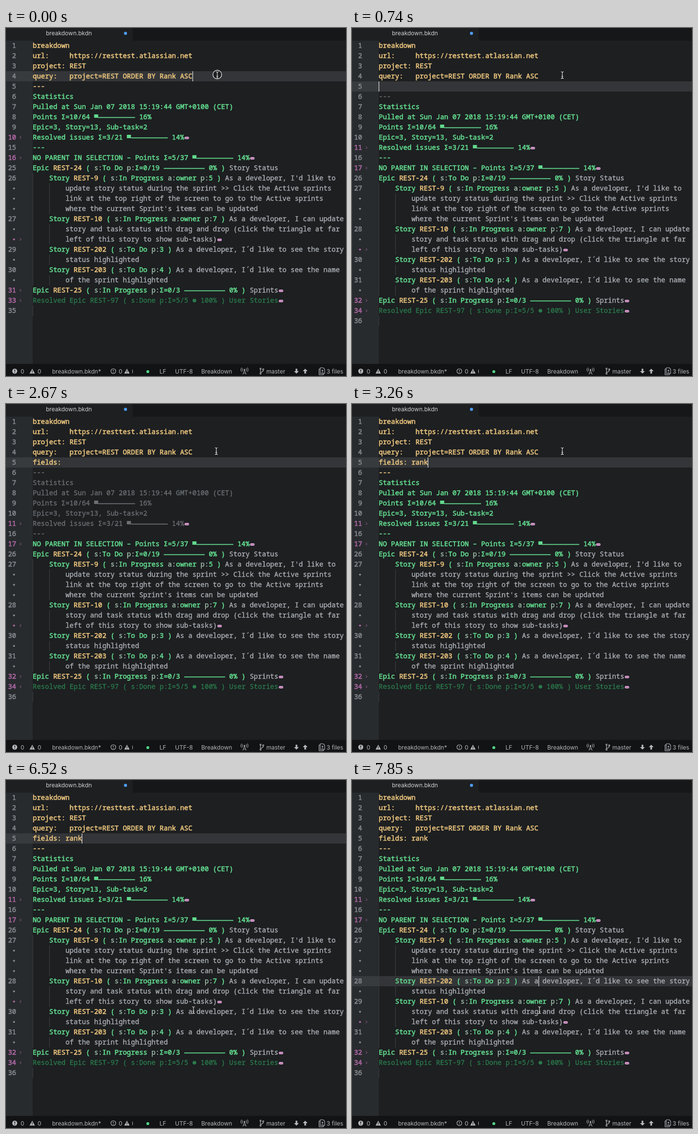
An HTML page with a canvas that plays this animation: 700x717 px, repeating every 8000 ms.

```html
<!DOCTYPE html>
<html lang="en">
<head>
<meta charset="utf-8">
<title>Editor</title>
<style>
html, body { margin: 0; width: 100%; height: 100%; overflow: hidden; background: #1d1f21; }
canvas { display: block; }
</style>
</head>
<body>
<canvas id="stage" width="700" height="717"></canvas>
<script>
const ctx = document.getElementById('stage').getContext('2d');
const LOOP = 8000, TICK = LOOP / 54;
const LEFT = 55, TOP = 26, ROW = 21, CELL = 8.428;
const MONO = '500 14.05px "Noto Sans Mono", "DejaVu Sans Mono", monospace';
const UI = '12px Inter, Roboto, sans-serif';
const YELLOW = '#e8c27c', GREEN = '#62d98d', DIM = '#2a7a4b', LABEL = '#a3c0ae',
      TEXT = '#adb1b6', GREY = '#6c7074', PINK = '#b068a6', PILL = '#e3a3d8',
      NUM = '#83898e', STATUS = '#b4b7bb';
const LINE = '━'.repeat(10), BAR = '▀' + LINE.slice(1);

// A line is a list of [text, colour] runs; span counts the file lines it folds.
const line = (text, color, span = 1) => ({ runs: [[text, color]], span, wraps: [], indent: 0 });

function item(type, key, fields, title, { wraps = [], span = 1, indent = 0 } = {}) {
  const runs = [[type + ' ', GREEN], [key, YELLOW], [' ( ', GREEN]];
  for (const part of fields.split(/(\b[sap]:)/))
    runs.push([part, /^[sap]:$/.test(part) ? LABEL : GREEN]);
  runs.push([' ) ', GREEN], [title, TEXT]);
  return { runs, span, wraps, indent };
}
const story = (key, fields, title, wraps, span) =>
  item('Story', key, fields, title, { wraps, span, indent: 4 });

const header = ['breakdown', 'url:     https://resttest.atlassian.net', 'project: REST',
  'query:   project=REST ORDER BY Rank ASC'].map(s => line(s, YELLOW));
const stats = [
  ['Statistics'], ['Pulled at Sun Jan 07 2018 15:19:44 GMT+0100 (CET)'],
  [`Points Σ=10/64 ${BAR} 16%`], ['Epic=3, Story=13, Sub-task=2'],
  [`Resolved issues Σ=3/21 ${BAR} 14%`, 5], ['---']];
const before = [
  line(`NO PARENT IN SELECTION – Points Σ=5/37 ${BAR} 14%`, GREEN, 9),
  item('Epic', 'REST-24', `s:To Do p:Σ=0/19 ${LINE} 0%`, 'Story Status'),
  story('REST-9', 's:In Progress a:owner p:5', "As a developer, I'd like to", [
    'update story status during the sprint >> Click the Active sprints',
    'link at the top right of the screen to go to the Active sprints',
    "where the current Sprint's items can be updated"])];
const dragStory = story('REST-10', 's:In Progress a:owner p:7', 'As a developer, I can update', [
  'story and task status with drag and drop (click the triangle at far',
  'left of this story to show sub-tasks)'], 2);
const statusStory = story('REST-202', 's:To Do p:3', 'As a developer, I´d like to see the story',
  ['status highlighted']);
const after = [
  story('REST-203', 's:To Do p:4', 'As a developer, I´d like to see the name',
    ['of the sprint highlighted']),
  item('Epic', 'REST-25', `s:In Progress p:Σ=0/3 ${LINE} 0%`, 'Sprints', { span: 2 }),
  line('Resolved Epic REST-97 ( s:Done p:Σ=5/5 ● 100% ) User Stories', DIM, 2),
  line('', TEXT)];

function typed(k) {
  if (k < 9) return '';
  if (k < 20) return 'fields: '.slice(0, k - 8);
  return 'fields: ' + ['r', 'ran', 'rank'][Math.min(k - 20, 2)];
}

function documentAt(k) {
  const inserted = k >= 5, entry = typed(k);
  // Colouring of the block below lags the edited line by one tick.
  const broken = k => (k >= 5 && k < 9) || (k >= 15 && k < 20);
  const rule = broken(k) ? GREY : YELLOW;
  const statColor = broken(k - 1) ? GREY : GREEN;
  const pair = k < 53 ? [dragStory, statusStory] : [statusStory, dragStory];
  return [...header,
    ...(inserted ? [line(entry, k < 15 ? GREY : YELLOW)] : []),
    line('---', rule), ...stats.map(([s, span]) => line(s, statColor, span)),
    ...before, ...pair, ...after];
}

function rect(x, y, w, h, color) {
  ctx.fillStyle = color;
  ctx.fillRect(x, y, w, h);
}
function disc(x, y, r, color) {
  ctx.fillStyle = color;
  ctx.beginPath();
  ctx.arc(x, y, r, 0, 7);
  ctx.fill();
}
function stroke(path, color = STATUS, width = 1.2) {
  ctx.strokeStyle = color;
  ctx.lineWidth = width;
  ctx.stroke(new Path2D(path));
}
function write(text, x, y, color, font = UI, align = 'left') {
  ctx.font = font;
  ctx.textAlign = align;
  ctx.fillStyle = color;
  ctx.fillText(text, x, y);
}
// Code is set in a medium weight, heavier for the coloured syntax.
function code(text, x, y, color, align) {
  write(text, x, y, color, MONO, align);
  ctx.strokeStyle = color;
  ctx.lineWidth = [YELLOW, GREEN, PINK, NUM].includes(color) ? .65 : .35;
  ctx.lineJoin = 'round';
  ctx.strokeText(text, x, y);
}

function drawRun(text, col, top, color) {
  for (const part of text.split(/(▀|━+|●)/)) {
    const x = LEFT + col * CELL, w = part.length * CELL;
    if (part === '▀') rect(x, top + 5, w, 7, color);
    else if (part[0] === '━') rect(x, top + 10.5, w, 1.8, color);
    else if (part === '●') disc(x + CELL / 2, top + 10.5, 3.8, color);
    else code(part, x, top + 15, color);
    col += part.length;
  }
  return col;
}
function drawFold(col, top) {
  const x = LEFT + col * CELL + 1, y = top + 9;
  ctx.fillStyle = PILL;
  ctx.beginPath();
  ctx.roundRect(x, y, 9, 5, 2);
  ctx.fill();
  for (const dx of [2, 4.2, 6.4]) rect(x + dx, y + 2, 1.2, 1.2, '#4a3047');
}
function chevron(top) {
  stroke(`M28.5 ${top + 8}l2.5 2.5l-2.5 2.5`, PINK, 1);
}

function drawLines(lines) {
  let top = TOP, number = 1;
  for (const { runs, span, wraps, indent } of lines) {
    const folded = span > 1, foldHere = folded && !wraps.length;
    code(number, 21, top + 15, foldHere ? PINK : NUM, 'right');
    if (indent || !runs[0][0] && number > 30)
      rect(LEFT, top, 1, ROW * (1 + wraps.length), '#3a3d40');
    let col = indent;
    for (const [text, color] of runs) col = drawRun(text, col, top, color);
    if (foldHere) { drawFold(col, top); chevron(top); }
    wraps.forEach((text, i) => {
      top += ROW;
      const last = folded && i === wraps.length - 1;
      rect(89, top, 1, ROW, '#3f4245');
      disc(16.5, top + 10.5, 2, last ? PINK : NUM);
      col = drawRun(text, 8, top, TEXT);
      if (last) { drawFold(col, top); chevron(top); }
    });
    top += ROW;
    number += span;
  }
}

function caretAt(k) {
  const row = k < 5 ? 3 : k < 46 ? 4 : k < 53 ? 21 : 18;
  const col = k < 5 || k >= 46 ? 39 : typed(k).length;
  const on = k < 22 ? k !== 2 && k !== 3 && k !== 4 && k !== 18 && k !== 19
    : k < 43 ? Math.floor((k * TICK - 3155) / 400) % 2 === 0
    : k < 49 || k >= 52;
  return { row, col, on };
}

const path = [[0, 435, 97], [1, 433, 97], [29, 433, 97], [33, 421, 261], [34, 421, 261],
  [35, 420, 268], [42, 386, 464], [44, 386, 474], [54, 386, 474]];
function mouseAt(k) {
  const i = path.findIndex(p => p[0] > k);
  const [t0, x0, y0] = path[i - 1], [t1, x1, y1] = path[i];
  const f = (k - t0) / (t1 - t0);
  return [x0 + (x1 - x0) * f, y0 + (y1 - y0) * f];
}
function drawMouse(k) {
  const [x, y] = mouseAt(k).map(Math.round);
  if (k < 1 || k === 45 || k === 46) {
    disc(x, y - 1, 9, '#1d1f21');
    ctx.strokeStyle = '#e8e8e8';
    ctx.lineWidth = 1.3;
    ctx.stroke();
  }
  const beam = `M${x - 3} ${y - 7}q3 0 3 2q0 -2 3 -2M${x} ${y - 6}v12` +
    `M${x - 3} ${y + 7}q3 0 3 -2q0 2 3 2M${x - 2} ${y + 2.5}h4`;
  stroke(beam, '#111', 2.6);
  stroke(beam, '#eee', 1.2);
}

function triangle(x) {
  ctx.fillStyle = STATUS;
  ctx.fill(new Path2D(`M${x} 702l5.5 10h-11z`));
  rect(x - .6, 705.5, 1.3, 3.2, '#111315');
  rect(x - .6, 709.7, 1.3, 1.2, '#111315');
}
function arrow(x, dir) {
  ctx.fillStyle = STATUS;
  ctx.fill(new Path2D(`M${x} ${707 + 5 * dir}l-5 ${-5 * dir}h3.3v${-5 * dir}h3.4v${5 * dir}h3.3z`));
}
function drawChrome() {
  rect(0, 0, 700, 26, '#151719');
  rect(0, 0, 261, 26, '#1d1f21');
  write('breakdown.bkdn', 129.5, 15, '#ced0d3', UI, 'center');
  disc(246, 11, 3.2, '#4d9cf5');

  rect(0, 692, 700, 25, '#111315');
  disc(18, 707, 5.2, STATUS);
  rect(17.3, 703.6, 1.5, 4, '#111315');
  rect(17.3, 708.8, 1.5, 1.5, '#111315');
  triangle(54);
  stroke('M226 707a5 5 0 1 1 -10 0a5 5 0 1 1 10 0M221 704v3.6M221 709v1.2');
  triangle(249);
  rect(260, 704, 1, 7, STATUS);
  disc(292, 708, 3, '#4fd483');
  const labels = [['0', 30], ['0', 65], ['breakdown.bkdn*', 95], ['0', 232], ['LF', 316],
    ['UTF-8', 348], ['Breakdown', 402], ['master', 536], ['3 files', 660]];
  for (const [text, x] of labels) write(text, x, 712, STATUS);
  stroke('M491 705l-3.5 9M491 705l3.5 9M489 711h4M487.5 701q-2.5 3 0 6M494.5 701q2.5 3 0 6' +
    'M485.5 699.5q-4 4.5 0 9M496.5 699.5q4 4.5 0 9', STATUS, 1);
  disc(491, 704, 1.5, STATUS);
  stroke('M524 703v8M529.5 704.5v1.5q0 2 -5.5 3.5');
  for (const [x, y] of [[524, 702], [524, 712], [529.5, 703.5]]) {
    disc(x, y, 1.9, STATUS);
    disc(x, y, .8, '#111315');
  }
  arrow(598, 1);
  arrow(616, -1);
  stroke('M647 700h6l3 3v9h-9zM647 702.5h-2.5v12h9v-2.5M649.5 706h4M651.5 704v4M649.5 710h4',
    STATUS, 1.1);
}

function draw(now) {
  const k = Math.min(53, Math.floor((now % LOOP + 5) / TICK));
  const caret = caretAt(k), top = TOP + caret.row * ROW;
  rect(0, 0, 700, 717, '#1d1f21');
  rect(0, 26, LEFT, 666, '#282b2e');
  rect(0, top, LEFT, ROW, '#383b3e');
  rect(LEFT, top, 645, ROW, '#333538');
  drawLines(documentAt(k));
  if (caret.on) rect(Math.round(LEFT + caret.col * CELL), top, 1, ROW, '#fff');
  drawChrome();
  drawMouse(k);
}

const start = performance.now();
function loop() {
  draw(performance.now() - start);
  requestAnimationFrame(loop);
}
loop();
</script>
</body>
</html>
```
